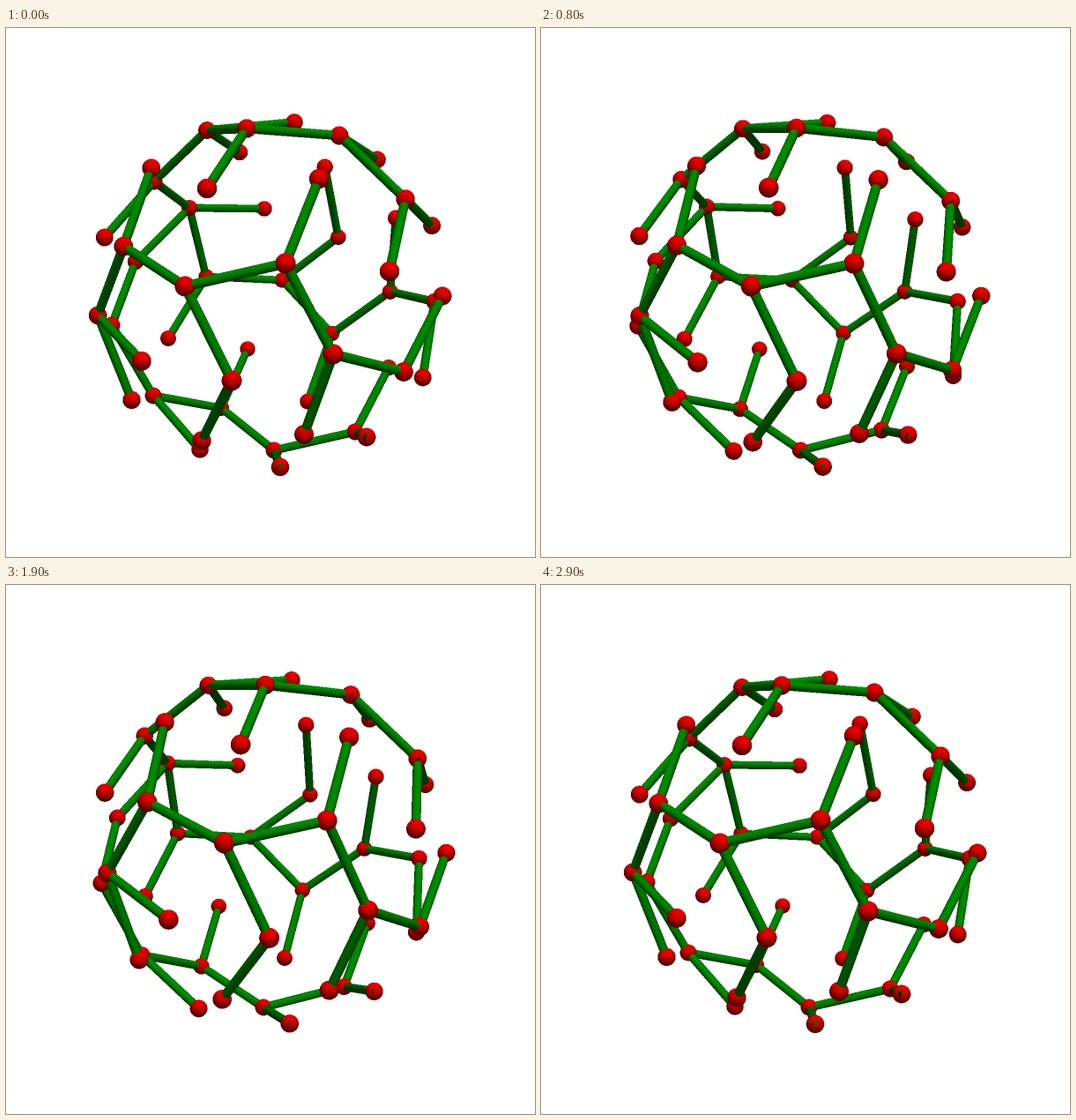
Write an HTML page with a canvas that moves like this. It is 600 by 600 pixels and loops after 3 s.

```html
<!DOCTYPE html>
<html lang="en">
<head>
<meta charset="utf-8">
<title>Rocking sphere of rods and balls</title>
<style>
  html, body { margin: 0; width: 100%; height: 100%; overflow: hidden; background: #fff; }
  canvas { display: block; width: 600px; height: 600px; }
</style>
</head>
<body>
<canvas id="stage" width="600" height="600"></canvas>
<script>
const SIZE = 600, SS = 2, W = SIZE * SS;
const RADIUS = 197;               // sphere radius in px at the centre's depth
const Q = 0.156;                  // sphere radius / camera distance
const STEP = 1.2 * Math.PI / 180; // turn per pose
const POSES = 15, POSE_MS = 100;
const BALL = 0.05, ROD = 0.025;
const RED = [255, 0, 0], GREEN = [0, 155, 0];

// Screen positions of the joints, seen at a pose, on the near or far side of the sphere.
const sightings = [
  { pose: 0, side: 1, at: [
    [203, 293], [317, 267], [256, 400], [222, 468], [355, 171], [371, 370], [338, 461], [451, 390],
    [495, 304], [273, 114], [228, 182], [378, 122], [453, 194], [435, 276], [311, 498], [409, 464]] },
  { pose: 13, side: 1, at: [
    [186, 155], [170, 246], [120, 327], [195, 380], [155, 426], [114, 235]] },
  { pose: 0, side: -1, at: [
    [228, 116], [327, 107], [265, 141], [168, 174], [208, 204], [293, 205], [227, 282], [313, 286],
    [147, 265], [184, 352], [120, 337], [167, 417], [220, 478], [244, 431], [274, 364], [304, 479],
    [396, 458]] },
  { pose: 13, side: -1, at: [
    [335, 238], [333.5, 159], [326, 346], [308, 423], [397, 299], [412, 218], [462, 310], [462, 393],
    [402, 383], [409, 153], [472, 227]] }
];

// Chains of joints linked by rods.
const chains = [
  [16, 17, 0, 1, 5, 7, 8], [17, 18, 19], [18, 20], [0, 2, 3], [1, 4], [5, 6],
  [44, 43, 41, 29, 28, 26, 30, 32, 33, 35, 37, 38, 47], [43, 45, 46], [41, 42],
  [29, 39, 40], [28, 31], [26, 27], [26, 25, 22, 9, 11, 12, 13], [25, 21], [22, 23],
  [22, 24], [9, 10], [11, 48], [12, 49], [33, 34], [35, 36], [37, 14], [38, 15]
];

// Key, fill, head and two back lights: direction (y down) and strength.
const lights = [
  [0.112, -0.766, 0.633, 0.75], [0, 0.966, 0.259, 0.25], [0, 0, 1, 0.25],
  [0.94, 0, -0.342, 0.21], [-0.94, 0, -0.342, 0.21]
];

const sub = (a, b) => a.map((v, i) => v - b[i]);
const dot = (a, b) => a[0] * b[0] + a[1] * b[1] + a[2] * b[2];
const unit = a => { const l = Math.hypot(...a); return a.map(v => v / l); };
const cross = (a, b) => [
  a[1] * b[2] - a[2] * b[1], a[2] * b[0] - a[0] * b[2], a[0] * b[1] - a[1] * b[0]
];

function turn([x, y, z], angle) {
  const c = Math.cos(angle), s = Math.sin(angle);
  return [x * c + z * s, y, z * c - x * s];
}

// Where the sight line through a screen point meets the unit sphere.
function lift([px, py], side) {
  const u = (px - SIZE / 2) / RADIUS, v = (py - SIZE / 2) / RADIUS;
  const r2 = u * u + v * v, q2 = Q * Q;
  const root = Math.sqrt(Math.max(0, 1 - r2 + q2 * r2));
  const z = (Q * r2 + side * root) / (1 + q2 * r2);
  return [u * (1 - Q * z), v * (1 - Q * z), z];
}

function project([x, y, z]) {
  const s = 1 / (1 - Q * z), k = RADIUS * s * SS;
  return { x: W / 2 + x * k, y: W / 2 + y * k, s };
}

const joints = sightings.flatMap(g => g.at.map(p => turn(lift(p, g.side), -g.pose * STEP)));
const rods = chains.flatMap(c => c.slice(1).map((b, i) => [c[i], b]));

const ctx = document.getElementById("stage").getContext("2d");
const big = document.createElement("canvas");
big.width = big.height = W;
const bigCtx = big.getContext("2d");
const image = bigCtx.createImageData(W, W);
const pixels = new Uint32Array(image.data.buffer);
const depth = new Float32Array(W * W);

function plot(x, y, z, nx, ny, nz, color) {
  const i = y * W + x;
  if (z <= depth[i]) return;
  depth[i] = z;
  let light = 0;
  for (const l of lights) light += l[3] * Math.max(0, nx * l[0] + ny * l[1] + nz * l[2]);
  light = Math.min(1, light);
  const [r, g, b] = color;
  pixels[i] = (255 << 24 | b * light << 16 | g * light << 8 | r * light) >>> 0;
}

// Visits the pixel centres inside a box.
function scan(x0, y0, x1, y1, visit) {
  for (let y = Math.floor(y0); y <= y1; y++)
    for (let x = Math.floor(x0); x <= x1; x++) visit(x, y, x + 0.5, y + 0.5);
}

function drawBall(p) {
  const c = project(p), r = BALL * RADIUS * c.s * SS;
  scan(c.x - r, c.y - r, c.x + r, c.y + r, (x, y, cx, cy) => {
    const u = (cx - c.x) / r, v = (cy - c.y) / r, h = 1 - u * u - v * v;
    if (h < 0) return;
    const n = Math.sqrt(h);
    plot(x, y, p[2] + BALL * n, u, v, n, RED);
  });
}

function drawRod(p, q) {
  const a = project(p), b = project(q);
  const dx = b.x - a.x, dy = b.y - a.y, len = Math.hypot(dx, dy);
  if (len < 1) return;
  const axis = unit(sub(q, p));
  const mid = p.map((v, i) => (v + q[i]) / 2);
  const view = unit(sub([0, 0, 1 / Q], mid));
  const across = cross(axis, view), slant = Math.hypot(...across);
  let side = unit(across);
  if (side[1] * dx - side[0] * dy < 0) side = side.map(v => -v);
  let front = cross(side, axis);
  if (dot(front, view) < 0) front = front.map(v => -v);
  const pad = ROD * RADIUS * Math.max(a.s, b.s) * SS;
  scan(Math.min(a.x, b.x) - pad, Math.min(a.y, b.y) - pad,
       Math.max(a.x, b.x) + pad, Math.max(a.y, b.y) + pad, (x, y, cx, cy) => {
    const ex = cx - a.x, ey = cy - a.y;
    const t = (ex * dx + ey * dy) / (len * len);
    if (t < 0 || t > 1) return;
    const s = a.s + (b.s - a.s) * t;
    const u = (ey * dx - ex * dy) / len / (ROD * RADIUS * s * SS);
    if (u * u > 1) return;
    const f = Math.sqrt(1 - u * u);
    const z = (1 - 1 / s) / Q + ROD * f / slant;
    plot(x, y, z, side[0] * u + front[0] * f, side[1] * u + front[1] * f,
         side[2] * u + front[2] * f, GREEN);
  });
}

function draw(pose) {
  pixels.fill(0xffffffff);
  depth.fill(-9);
  const placed = joints.map(p => turn(p, pose * STEP));
  for (const [a, b] of rods) drawRod(placed[a], placed[b]);
  placed.forEach(drawBall);
  bigCtx.putImageData(image, 0, 0);
  ctx.drawImage(big, 0, 0, SIZE, SIZE);
}

// Poses run forward, then back, each end held for two steps.
let shown = -1;
function tick() {
  const i = Math.floor(performance.now() / POSE_MS) % (2 * POSES);
  const pose = Math.min(i, 2 * POSES - 1 - i);
  if (pose !== shown) draw(shown = pose);
  requestAnimationFrame(tick);
}
tick();
</script>
</body>
</html>
```
